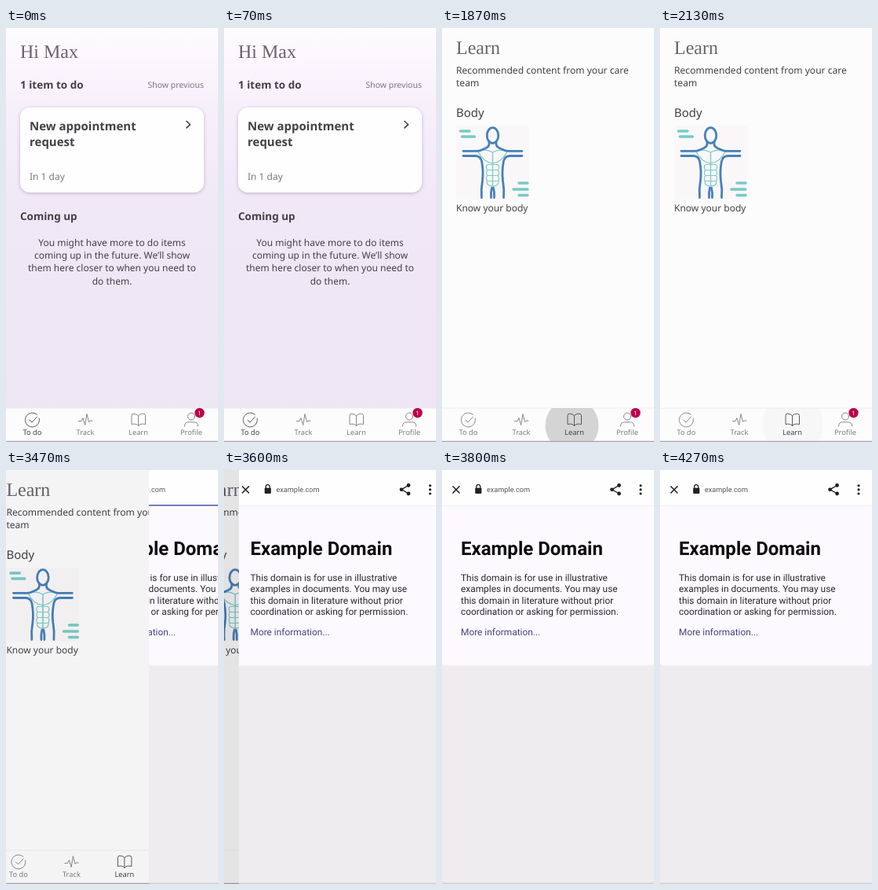
Animation, 270 px wide and 526 px high, one loop 4990 ms. Source, as an HTML page:

```html
<!DOCTYPE html>
<html lang="en">
<head>
<meta charset="utf-8">
<title>Care app</title>
<style>
html, body { margin: 0; width: 100%; height: 100%; overflow: hidden; background: #fdfdfd; }
svg { display: block; width: 100vw; height: 100vh; }
text { font-family: "Noto Sans", sans-serif; font-size: 12px; fill: #444047; text-rendering: geometricPrecision; }
.title { font: 24px "Liberation Serif", serif; fill: #6a636b; }
.strong { font-size: 13.5px; font-weight: 600; }
.card { font-size: 15px; font-weight: 600; }
.muted { fill: #7d7780; }
.mid { text-anchor: middle; }
.tab text { font-size: 9.3px; text-anchor: middle; fill: #807c83; }
.tab.on text { fill: #444047; font-weight: 500; }
.icon { fill: none; stroke: #8a868c; stroke-linecap: round; stroke-linejoin: round; }
.on .icon { stroke: #5a565c; }
.body { fill: none; stroke: #4581b8; stroke-width: 2.8; stroke-linecap: round; stroke-linejoin: round; }
.muscle { fill: none; stroke: #7ccdc8; stroke-width: 1.2; }
.dash { fill: none; stroke: #76cbc5; stroke-width: 3.4; stroke-linecap: round; }
.web text { font: 11.9px Roboto, sans-serif; fill: #2b292d; }
.web .head { font: bold 24px Roboto, sans-serif; fill: #0b0a0c; }
.web .link { fill: #47457f; }
.web .url { font-size: 9.15px; fill: #555; }
</style>
</head>
<body>
<svg viewBox="0 0 270 526" preserveAspectRatio="none">
  <defs>
    <linearGradient id="sky" x2="0" y2="1">
      <stop offset="0" stop-color="#fefcff"/>
      <stop offset=".2" stop-color="#f7f0fb"/>
      <stop offset=".45" stop-color="#f0e8f7"/>
      <stop offset="1" stop-color="#eee6f5"/>
    </linearGradient>
    <filter id="lift" x="-10%" y="-10%" width="120%" height="125%">
      <feDropShadow dx="0" dy="1" stdDeviation="2" flood-color="#5d4670" flood-opacity=".36"/>
    </filter>
    <clipPath id="bar"><rect y="483" width="270" height="42"/></clipPath>
    <clipPath id="reveal"><rect id="window" width="270" height="526"/></clipPath>
  </defs>

  <g id="app">
    <rect width="270" height="526" fill="#fdfcfd"/>

    <g id="todo">
      <rect width="270" height="483" fill="url(#sky)"/>
      <text class="title" x="18" y="38">Hi Max</text>
      <text class="strong" x="18" y="76.5">1 item to do</text>
      <text class="muted" x="252" y="75.5" text-anchor="end" style="font-size:10.5px">Show previous</text>
      <rect x="18" y="101" width="234" height="108" rx="12.5" fill="#fefefe" filter="url(#lift)"/>
      <text class="card" x="30" y="129.5">New appointment</text>
      <text class="card" x="30" y="149.5">request</text>
      <path d="M229.5 118l5 4.7-5 4.7" fill="none" stroke="#444047" stroke-width="1.6"/>
      <text class="muted" x="30" y="193">In 1 day</text>
      <text class="strong" x="18" y="244">Coming up</text>
      <text class="mid" x="135" y="277">You might have more to do items</text>
      <text class="mid" x="135" y="293">coming up in the future. We’ll show</text>
      <text class="mid" x="135" y="309.3">them here closer to when you need to</text>
      <text class="mid" x="135" y="325.5">do them.</text>
    </g>

    <g id="learn">
      <text class="title" x="18" y="33">Learn</text>
      <text x="18" y="57.7" style="font-size:12.1px">Recommended content from your care</text>
      <text x="18" y="73.7" style="font-size:12.1px">team</text>
      <text x="18" y="112.5" style="font-size:15px">Body</text>
      <rect x="18" y="124" width="93" height="94" fill="#faf7f9"/>
      <path class="dash" d="M23.5 131H35M25.5 138H41.5M98 197H109M91 205H109M98 212.5H109"/>
      <g id="half">
        <path class="muscle" d="M64.5 158Q56 153 46 157Q52 170 64.5 172M64.5 158V201M64.5 173.5H59Q56.500 173.500 56.500 177T59 180.500H64.500M59 180.500Q56.500 180.500 56.500 184T59 187.500H64.500M59 187.500Q56.500 187.500 56.500 191T59 194.500H64.500M57 194.500Q57 201 64.500 201"/>
        <path class="body" d="M60 145V148Q59.500 151 55 153L49 155.500Q47 156.300 44 156.300H27M27 162.500H43Q49 163 50.500 169Q53 182 51.500 194Q49.500 205 50.500 215.500M63.500 203Q62 209 62.500 215.500"/>
      </g>
      <use href="#half" transform="translate(129) scale(-1 1)"/>
      <ellipse class="body" cx="64.5" cy="136.5" rx="7.3" ry="9.8" style="fill:#faf7f9"/>
      <text x="18" y="232.7">Know your body</text>
    </g>

    <rect y="482.5" width="270" height="1" fill="#f1eef2"/>
    <g clip-path="url(#bar)"><circle id="ripple"/></g>
    <g class="tab" id="todoTab">
      <path class="icon" d="M39.5 491.2A9 9 0 1 0 42.3 496M30 498l3 3 6.500-7"/>
      <text x="33.5" y="517.3">To do</text>
    </g>
    <g class="tab">
      <path class="icon" d="M92.5 499.5H96l2-4 2.700 9 2.300-14 2.500 10 1.200-1.500H110"/>
      <text x="101" y="517.3">Track</text>
    </g>
    <g class="tab" id="learnTab">
      <path class="icon" d="M168.5 492.500Q166 490 162.500 490Q160 490 160 492.500V503.500Q166 502 168.500 505.500Q171 502 177.500 503.500V492.500Q177.500 490 174.500 490Q171 490 168.500 492.500V505.500"/>
      <text x="168.5" y="517.3">Learn</text>
    </g>
    <g class="tab">
      <path class="icon" d="M227.500 506V505Q228 500.800 232.500 500.800H239.500Q244 500.800 244.500 505V506"/>
      <circle class="icon" cx="236" cy="493.5" r="4.500"/>
      <text x="236" y="517.3">Profile</text>
      <circle cx="246.5" cy="489" r="6.2" fill="#bd0049"/>
      <text x="246.5" y="491.6" style="font-size:7.5px;fill:#fff">1</text>
    </g>
    <rect y="524.7" width="270" height="1.3" fill="#aaa7ab"/>
  </g>
  <rect id="dim" width="270" height="526"/>

  <g id="web" class="web" clip-path="url(#reveal)">
    <g id="sheet">
      <rect width="270" height="526" fill="#eeecef"/>
      <path d="M0 45H270V244Q270 248.5 265.5 248.5H4.5Q0 248.5 0 244Z" fill="#fcf9ff"/>
      <rect width="270" height="45" fill="#fefefe"/>
      <rect y="45" width="270" height="1" fill="#f1eff3"/>
      <rect id="loading" y="44" width="270" height="1.7" fill="#5a6cba"/>
      <path d="M13.5 20.5l9 9m0-9l-9 9" stroke="#222" stroke-width="1.6"/>
      <path d="M43.8 23v-1.8a2.5 2.5 0 0 1 5 0V23" fill="none" stroke="#222" stroke-width="1.3"/>
      <rect x="42.2" y="22.8" width="8.2" height="7.2" rx="1" fill="#222"/>
      <text class="url" x="57" y="28.3">example.com</text>
      <path d="M225.5 19.5L216.5 24.8l9 5.2" fill="none" stroke="#222" stroke-width="1.4"/>
      <g fill="#222">
        <circle cx="225.5" cy="19.5" r="2.4"/><circle cx="216.5" cy="24.8" r="2.4"/><circle cx="225.5" cy="30" r="2.4"/>
        <circle cx="253" cy="19.8" r="1.6"/><circle cx="253" cy="24.9" r="1.6"/><circle cx="253" cy="30" r="1.6"/>
      </g>
      <text class="head" x="24" y="108">Example Domain</text>
      <text x="24" y="141">This domain is for use in illustrative</text>
      <text x="24" y="155.3">examples in documents. You may use</text>
      <text x="24" y="169.5">this domain in literature without prior</text>
      <text x="24" y="183.8">coordination or asking for permission.</text>
      <text class="link" x="24" y="209.8">More information...</text>
      <rect y="524.5" width="270" height="1.5" fill="#d2d0d3"/>
    </g>
  </g>
</svg>
<script>
const LOOP = 4990, WIDTH = 270;
const LEARN_AT = 1870, LOADED_AT = 3600;
// time, centre x, centre y, radius, opacity
const RIPPLE = [
  [0, 160, 512, 0, 0],
  [1800, 160, 512, 22, .04],
  [1870, 165.5, 505, 34, .16],
  [1930, 168, 504, 38, .13],
  [2000, 169, 504, 39, .09],
  [2070, 169, 504, 39, .05],
  [2130, 169, 504, 39, .02],
  [3470, 169, 504, 39, 0]
];
// time, left edge of the browser window
const EDGE = [[0, 270], [3470, 182], [3530, 47], [3600, 19], [3670, 6], [3730, 3], [3800, 0]];

const $ = id => document.getElementById(id);
const set = (id, attrs) => {
  for (const name in attrs) $(id).setAttribute(name, attrs[name]);
};
const show = (id, visible) => set(id, { visibility: visible ? "visible" : "hidden" });
const stepAt = (steps, time) => steps.findLast(step => step[0] <= time);

function draw(time) {
  const onLearn = time >= LEARN_AT;
  show("todo", !onLearn);
  show("learn", onLearn);
  $("todoTab").classList.toggle("on", !onLearn);
  $("learnTab").classList.toggle("on", onLearn);

  const [, cx, cy, r, opacity] = stepAt(RIPPLE, time);
  set("ripple", { cx, cy, r, opacity });

  const edge = stepAt(EDGE, time)[1];
  const progress = 1 - edge / WIDTH;
  set("app", { transform: `translate(${-54 * progress})` });
  set("dim", { opacity: 0.1 * progress });
  set("window", { x: edge });
  set("sheet", { transform: `translate(${edge / 2})` });
  show("web", progress > 0);
  set("loading", { opacity: time < LOADED_AT ? 1 : 0 });
}

const start = performance.now();
function tick() {
  draw((performance.now() - start) % LOOP);
  requestAnimationFrame(tick);
}
tick();
</script>
</body>
</html>
```
